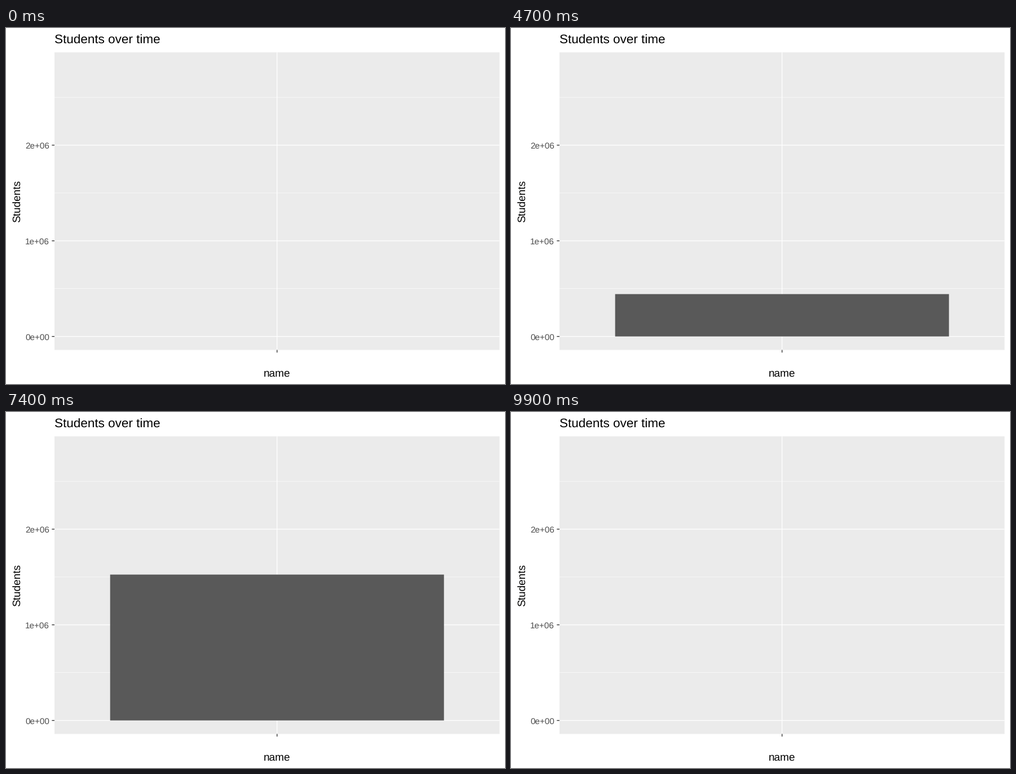
These frames come from a looping animation (885x632 px, 10 s). A matplotlib script:

```python
import matplotlib.pyplot as plt
import numpy as np
from matplotlib.animation import FuncAnimation
from matplotlib.patches import Rectangle

W, H, DPI = 885, 632, 100
FRAMES, INTERVAL = 100, 100
LEFT, RIGHT, TOP, BOTTOM = 86.0, 875.4, 43.3, 571.5
ZERO, MILLION = 547.6, 169.8          # pixel row of 0 and pixels per 1e6
MID_X, MID_Y = (LEFT + RIGHT) / 2, (TOP + BOTTOM) / 2
PT = 72 / DPI

# (step, pixel row of the bar top), joined by straight lines
STEPS, TOPS = zip((1, 547), (5, 546), (13, 540.3), (23, 536.3), (28, 530),
                  (33, 521), (50, 462), (62, 404), (65, 374.5), (77, 260),
                  (80, 212.5), (89, 114.3), (94, 70.4), (95, 68.2), (97, 99))

plt.rcParams["font.family"] = ["Liberation Sans", "DejaVu Sans"]
plt.rcParams["text.hinting"] = "none"

fig = plt.figure(figsize=(W / DPI, H / DPI), dpi=DPI, facecolor="white")
ax = fig.add_axes([0, 0, 1, 1])
ax.set_xlim(0, W)
ax.set_ylim(H, 0)
ax.axis("off")


def rect(x0, y0, x1, y1, color, z):
    patch = Rectangle((x0, y0), x1 - x0, y1 - y0, facecolor=color,
                      edgecolor="none", linewidth=0, zorder=z, snap=False)
    return ax.add_patch(patch)


def line(x0, y0, x1, y1, color="white", width=1.36):
    ax.plot([x0, x1], [y0, y1], color=color, lw=width * PT, zorder=2,
            solid_capstyle="butt", snap=False)


def label(x, y, text, px, color="black", **kw):
    ax.text(x, y, text, fontsize=px * PT, color=color, va="baseline",
            rotation_mode="anchor", **kw)


rect(LEFT, TOP, RIGHT, BOTTOM, "#EBEBEB", 1)
for value in (0.5, 1.5, 2.5):
    y = ZERO - value * MILLION
    line(LEFT, y, RIGHT, y, width=0.68)
for value in (0, 1, 2):
    y = ZERO - value * MILLION
    line(LEFT, y, RIGHT, y)
    line(LEFT - 4.7, y, LEFT, y, "#333333")
    label(LEFT - 9, y + 6, f"{value * 1e6:.0e}", 15.3, "#4D4D4D", ha="right")
line(MID_X, TOP, MID_X, BOTTOM)
line(MID_X, BOTTOM, MID_X, BOTTOM + 4.7, "#333333")

label(LEFT, 28, "Students over time", 22.5, ha="left")
label(MID_X - 0.4, 618.5, "name", 19, ha="center")
label(25, MID_Y, "Students", 19, ha="center", rotation=90)

half = (RIGHT - LEFT) * 0.375
bar = rect(MID_X - half, ZERO, MID_X + half, ZERO, "#595959", 3)


def rests(step):
    """The bar pauses on every fifth step, later only now and then."""
    return step % 5 == 4 if step < 50 else step in (51, 64, 66, 81, 83, 96, 98)


def update(step):
    if rests(step):
        step -= 1
    top = np.interp(step, STEPS, TOPS)
    bar.set_y(top)
    bar.set_height(ZERO - top)
    bar.set_visible(0 < step < FRAMES - 1)
    return (bar,)


anim = FuncAnimation(fig, update, frames=FRAMES, interval=INTERVAL,
                     repeat=True, repeat_delay=0, blit=False)
plt.show()
```
